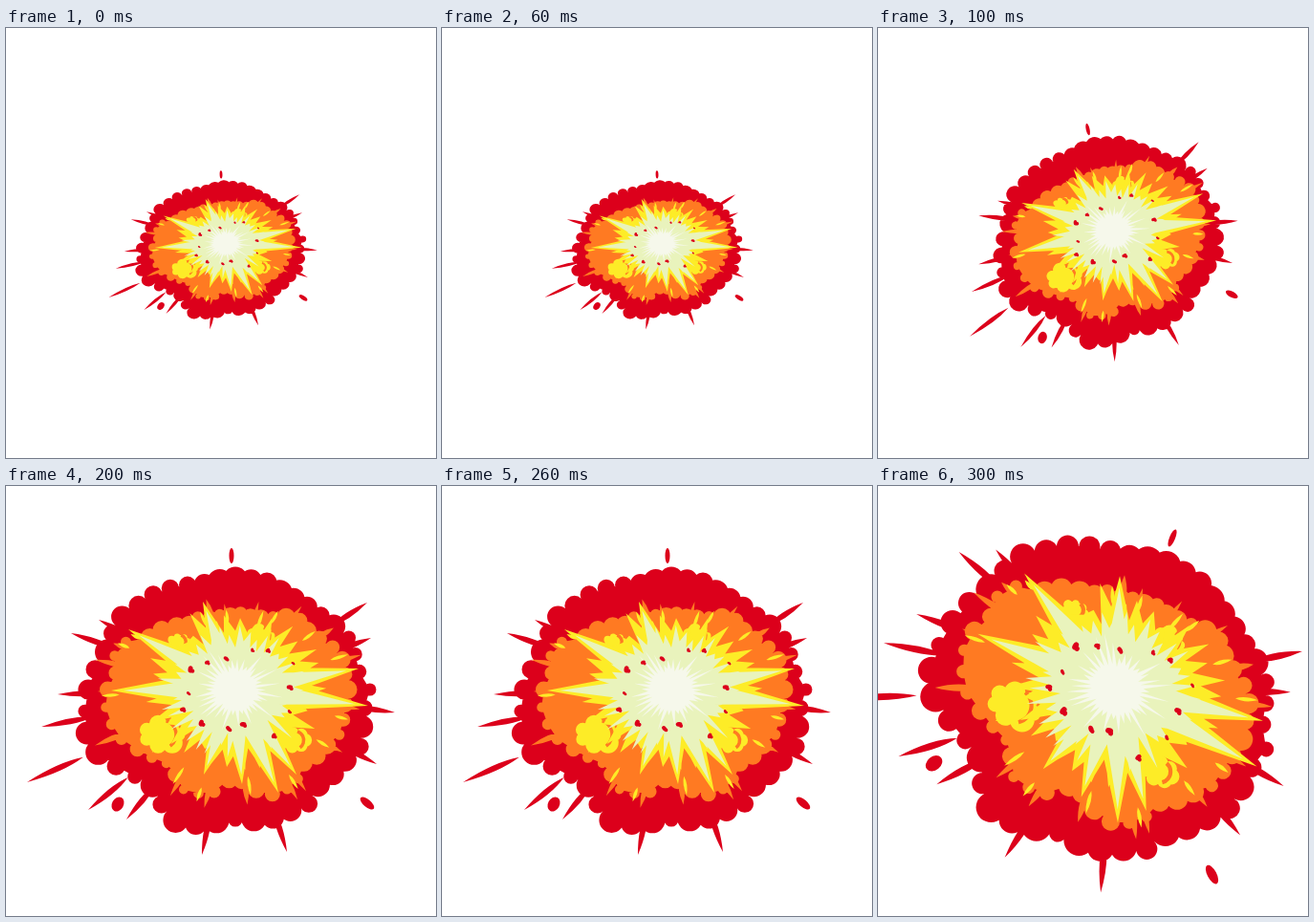
Recreate the animation shown at these times as an HTML page with a canvas. Size 450 by 450 pixels, loop 400 ms.

```html
<!DOCTYPE html>
<html lang="en">
<head>
<meta charset="utf-8">
<title>Explosion</title>
<style>
  html, body { margin: 0; width: 100%; height: 100%; overflow: hidden; background: #fff; }
  canvas { display: block; }
</style>
</head>
<body>
<canvas id="stage" width="450" height="450"></canvas>
<script>
const ctx = document.getElementById('stage').getContext('2d');
const RED = '#dc001b', ORANGE = '#ff7a22', YELLOW = '#fdec27', PALE = '#e9f3bc', WHITE = '#f6f8eb';
const STEP = 100, TAU = 2 * Math.PI, CX = 240, CY = 213;

// The burst is built once; each pose grows and turns it.
const poses = [
  [.571, -.031, .019, .515, 88.9, 123.1],
  [.76, -.17, .165, .76, 28.2, 90.8],
  [1, 0, 0, 1, 0, 0],
  [1.113, .45, -.45, 1.113, 78.2, -133]
];

// Cloud radii at even angles, clockwise from the right.
const redRadii = [145, 152, 145, 155, 144, 163, 143, 174, 165, 153, 146, 128, 128, 126, 127, 137];
const orangeRadii = [130, 122, 115, 130, 102, 124, 107, 140, 141, 131, 98, 88, 86, 90, 106, 119];

const redTips = [
  [22, 310], [37, 252], [54, 218], [68, 154], [97, 140], [86, 339], [126, 349],
  [205, 386], [294, 383], [407, 237], [388, 291], [378, 122], [382, 159]
];
const longTips = [
  [206, 121], [128, 150], [110, 214], [369, 191], [379, 230], [304, 302], [285, 321], [247, 312], [207, 302]
];
const yellowPuffs = [[163, 260, 25], [267, 157, 15], [181, 163, 12], [302, 266, 16]];

let seed = 7;
function random(min = 0, max = 1) {
  seed = seed * 16807 % 2147483647;
  return min + (max - min) * seed / 2147483647;
}

const polar = (angle, radius, squash = 1) =>
  [CX + radius * Math.cos(angle), CY + radius * squash * Math.sin(angle)];

const towardCentre = ([x, y], part) => [x + (CX - x) * part, y + (CY - y) * part];

function radiusAt(radii, angle) {
  const place = angle / TAU * radii.length, i = Math.floor(place), part = place - i;
  const from = radii[i % radii.length], to = radii[(i + 1) % radii.length];
  return from + (to - from) * part;
}

function oval(path, [x, y], rx, ry = rx, turn = 0) {
  const shape = new Path2D();
  shape.ellipse(x, y, rx, ry, turn, 0, TAU);
  path.addPath(shape);
}

function cloud(path, radii, count, size) {
  const body = new Path2D();
  for (let i = 0; i < count; i++) {
    const angle = i / count * TAU;
    const radius = random(.6, 1.25) * size;
    const centre = polar(angle, radiusAt(radii, angle) - radius + random(-4, 3));
    body.lineTo(...centre);
    oval(path, centre, radius);
  }
  path.addPath(body);
}

function cluster(path, [x, y, size]) {
  oval(path, [x, y], size * .8, size * .6);
  for (let angle = 0; angle < TAU; angle += TAU / 7)
    oval(path, [x + size * .7 * Math.cos(angle), y + size * .45 * Math.sin(angle)], size * random(.25, .45));
}

// A sliver that points away from the centre.
function dart(path, tip, tail, width) {
  const [x1, y1] = tip, [x2, y2] = tail;
  const length = Math.hypot(x1 - x2, y1 - y2);
  const nx = (y2 - y1) / length * width, ny = (x1 - x2) / length * width;
  const mx = x1 + (x2 - x1) * .6, my = y1 + (y2 - y1) * .6;
  path.moveTo(x1, y1);
  path.quadraticCurveTo(mx + nx, my + ny, x2, y2);
  path.quadraticCurveTo(mx - nx, my - ny, x1, y1);
}

function dartRing(path, radii, count, scale, length, width) {
  for (let i = 0; i < count; i++) {
    const angle = (i + random()) / count * TAU;
    const radius = radiusAt(radii, angle) * random(scale - .06, scale + .06);
    dart(path, polar(angle, radius), polar(angle, radius - random(.6, 1.2) * length), width);
  }
}

function star(path, count, valley, shortest, longest, squash) {
  for (let i = 0; i < count; i++) {
    const angle = (i + random(-.25, .25)) / count * TAU;
    const tip = polar(angle, random(shortest, longest), squash);
    if (i) path.lineTo(...tip); else path.moveTo(...tip);
    path.lineTo(...polar((i + .5) / count * TAU, valley * random(.9, 1.1), squash));
  }
  path.closePath();
}

function longSpikes(path, reach, width) {
  for (const tip of longTips) {
    const [x, y] = towardCentre(tip, 1 - reach);
    const angle = Math.atan2(y - CY, x - CX);
    path.moveTo(x, y);
    path.lineTo(...polar(angle + TAU / 4, width));
    path.lineTo(...polar(angle - TAU / 4, width));
    path.closePath();
  }
}

function chunks(path) {
  for (let i = 0; i < 14; i++) {
    const [x, y] = polar((i + random(-.3, .3)) / 14 * TAU, random(44, 76), .75);
    const size = random(1.8, 3.6);
    oval(path, [x, y], size, size * .7, i);
    oval(path, [x + size * .6, y + size * .5], size * .6);
  }
}

function curls(path) {
  for (const [x, y, size] of yellowPuffs) {
    const start = -TAU * .2, radius = size * .6;
    path.moveTo(x + radius * Math.cos(start), y + radius * Math.sin(start));
    path.arc(x, y, radius, start, TAU * .15);
  }
}

const layers = [];
function layer(color, build, stroke = 0) {
  const path = new Path2D();
  build(path);
  layers.push({ color, path, stroke });
}

layer(RED, path => {
  cloud(path, redRadii, 44, 11);
  redTips.forEach(tip => dart(path, tip, towardCentre(tip, .27), 6));
  oval(path, [236, 73], 2.5, 8);
  oval(path, [117, 333], 6, 8, .5);
  oval(path, [378, 332], 9, 4, .7);
});
layer(ORANGE, path => {
  cloud(path, orangeRadii, 46, 8);
  dartRing(path, orangeRadii, 18, 1.08, 38, 6);
});
layer(YELLOW, path => {
  yellowPuffs.forEach(puff => cluster(path, puff));
  dartRing(path, orangeRadii, 16, .97, 18, 3.5);
});
layer(ORANGE, curls, 3.5);
layer(YELLOW, path => {
  star(path, 34, 69, 76, 104, .88);
  longSpikes(path, 1, 24);
});
layer(PALE, path => {
  star(path, 42, 54, 60, 86, .88);
  longSpikes(path, .9, 16);
});
layer(WHITE, path => star(path, 38, 23, 29, 53, .9));
layer(RED, chunks);

function render() {
  const pose = Math.floor(performance.now() / STEP) % poses.length;
  ctx.setTransform(1, 0, 0, 1, 0, 0);
  ctx.clearRect(0, 0, 450, 450);
  ctx.setTransform(...poses[pose]);
  for (const { color, path, stroke } of layers) {
    ctx.fillStyle = ctx.strokeStyle = color;
    ctx.lineWidth = stroke;
    if (stroke) ctx.stroke(path); else ctx.fill(path);
  }
  requestAnimationFrame(render);
}
render();
</script>
</body>
</html>
```
